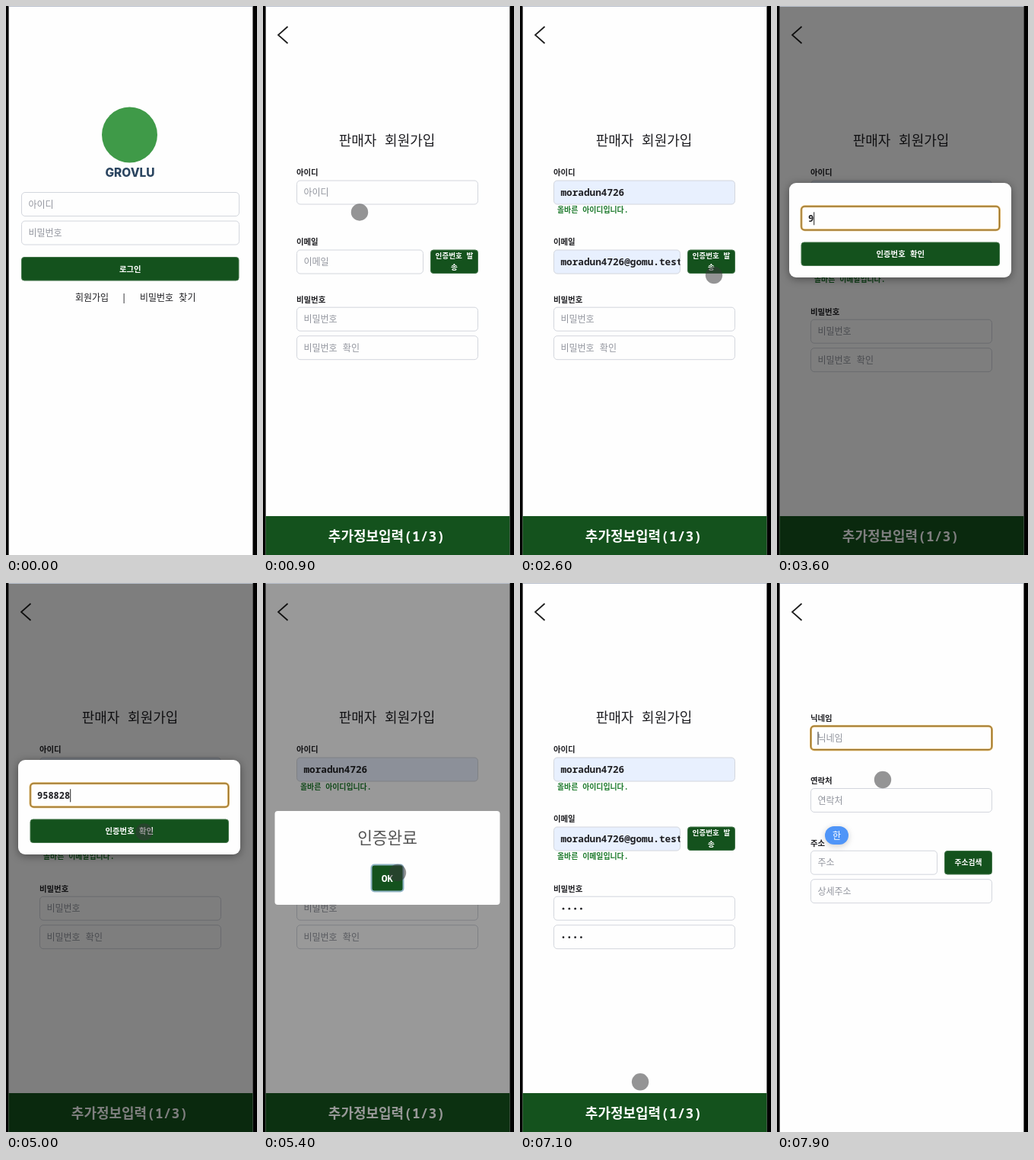
Write an HTML page with a canvas that moves like this. It is 330 by 720 pixels and loops after 8000 ms.

```html
<!DOCTYPE html>
<html lang="ko">
<head>
<meta charset="utf-8">
<title>회원가입</title>
<style>
html, body { margin: 0; width: 100%; height: 100%; overflow: hidden; background: #000; }
canvas { display: block; width: 330px; height: 720px; }
</style>
</head>
<body>
<canvas id="stage"></canvas>
<script>
const LOOP = 8000;
const MONO = '"Noto Sans Mono", "Noto Sans CJK KR", "Noto Sans CJK", monospace';
const SANS = 'Inter, Roboto, sans-serif';
const GREEN = '#14521d', INK = '#1f1f23', HINT = '#92959e', VALID = '#1d7a2c', ERROR = '#dc2f2f';
const USER = 'moradun4726', MAIL = USER + '@gomu.test', CODE = '958828';

const canvas = document.getElementById('stage');
const ctx = canvas.getContext('2d');
const ratio = window.devicePixelRatio || 1;
canvas.width = 330 * ratio;
canvas.height = 720 * ratio;

// The pointer shows up shortly before each tap and rests briefly after it
const taps = [
  { at: 400, x: 113, y: 384 },
  { at: 1000, x: 130, y: 246 },
  { at: 1600, x: 208, y: 346 },
  { at: 2180, x: 190, y: 538 },
  { at: 2560, x: 255, y: 353 },
  { at: 5060, x: 180, y: 326 },
  { at: 5370, x: 177, y: 380 },
  { at: 5820, x: 124, y: 428 },
  { at: 6270, x: 126, y: 470 },
  { at: 7200, x: 165, y: 694 },
  { at: 7540, x: 139, y: 204 },
  { at: 7690, x: 139, y: 258 }
];

const clamp = v => Math.max(0, Math.min(1, v));
const ramp = (t, start, span) => {
  const p = clamp((t - start) / span);
  return p * p * (3 - 2 * p);
};
const pulse = (t, start, end, span) => ramp(t, start, span) * (1 - ramp(t, end, span));
const within = (t, a, b) => t >= a && t < b;
const typed = (t, start, step, max) => Math.max(0, Math.min(max, Math.floor((t - start) / step) + 1));

function text(str, x, y, size, color = INK, { weight = 400, align = 'left', font = MONO } = {}) {
  ctx.font = `${weight} ${size}px ${font}`;
  ctx.textAlign = align;
  ctx.fillStyle = color;
  ctx.fillText(str, x, y);
}

const centered = (str, x, y, size, color = '#fff', weight = 700) =>
  text(str, x, y, size, color, { weight, align: 'center' });
const label = (str, y) => text(str, 44, y, 10.4, INK, { weight: 700 });
const note = (str, y, color) => text(str, 49, y, 9.9, color, { weight: 700 });

function box(x, y, w, h, r, fill) {
  ctx.beginPath();
  ctx.roundRect(x, y, w, h, r);
  ctx.fillStyle = fill;
  ctx.fill();
}

function stroke(color, width) {
  ctx.strokeStyle = color;
  ctx.lineWidth = width;
  ctx.stroke();
}

function disc(x, y, r, fill) {
  ctx.beginPath();
  ctx.arc(x, y, r, 0, 7);
  ctx.fillStyle = fill;
  ctx.fill();
}

function shadowed(alpha, blur, draw) {
  ctx.save();
  ctx.shadowColor = `rgba(0,0,0,${alpha})`;
  ctx.shadowBlur = blur * ratio;
  ctx.shadowOffsetY = 2 * ratio;
  draw();
  ctx.restore();
}

function faded(alpha, draw, scale = 1, cx = 0, cy = 0) {
  if (alpha <= 0) return;
  ctx.save();
  ctx.globalAlpha *= alpha;
  ctx.translate(cx, cy);
  ctx.scale(scale, scale);
  ctx.translate(-cx, -cy);
  draw();
  ctx.restore();
}

function button(x, y, w, h, lines, size) {
  box(x + .5, y + .5, w - 1, h - 1, 3.5, GREEN);
  stroke('#427549', 1);
  lines.forEach((line, i) => {
    const offset = (i - (lines.length - 1) / 2) * 15;
    centered(line, x + w / 2, y + h / 2 + size * .37 + offset, size);
  });
}

function field(x, y, w, hint, { value = '', size = 12.7, dots = 0, focus = false, fill = '#fefefe' } = {}) {
  box(x + .5, y + .5, w - 1, 31, 4.5, fill);
  if (focus) {
    stroke('#dfb669', 3);
    stroke('#93702f', 1.2);
  } else {
    stroke('#d3d6dd', 1);
  }
  ctx.save();
  ctx.beginPath();
  ctx.rect(x, y, w - .5, 32);
  ctx.clip();
  const left = x + 9.5;
  if (value) text(value, left, y + 20.5, size, INK, { weight: 600 });
  else if (!dots) text(hint, left, y + 20.5, 12, HINT);
  for (let i = 0; i < dots; i++) disc(left + 3.5 + i * 7.8, y + 16.5, 1.35, INK);
  if (focus) {
    const end = value ? ctx.measureText(value).width : dots * 7.8;
    ctx.fillStyle = '#222';
    ctx.fillRect(left + end, y + 8, 1, 17);
  }
  ctx.restore();
}

function backArrow() {
  ctx.beginPath();
  ctx.moveTo(32.5, 27);
  ctx.lineTo(20, 38);
  ctx.lineTo(32.5, 49);
  stroke('#1c1c1c', 1.7);
}

function bottomBar(shown, step) {
  if (shown <= 0) return;
  const y = 720 - 51 * shown;
  ctx.fillStyle = GREEN;
  ctx.fillRect(3, y, 322, 51);
  centered(`추가정보입력(${step}/3)`, 162.5, y + 32.5, 18);
}

function loginPage() {
  disc(162.5, 169, 36.5, '#3f9a48');
  text('GROVLU', 163, 223.5, 15.5, '#2b4560', { weight: 800, align: 'center', font: SANS });
  field(20, 244, 287, '아이디');
  field(20, 281.5, 287, '비밀번호');
  button(20, 329, 286.5, 31.5, ['로그인'], 10.4);
  text('회원가입', 91, 387, 12);
  centered('|', 155, 386.5, 12, INK, 400);
  text('비밀번호 찾기', 176, 387, 12);
}

function accountPage(t) {
  const hasId = t >= 1280, hasMail = t >= 2180, sent = t >= 2660;
  const autofill = (value, done) => done ? { value, fill: '#e8f0fe' } : {};
  const shift = sent ? 16 : 0;
  const dots = typed(t, 5920, 60, 4), repeatDots = typed(t, 6480, 80, 4);
  backArrow();
  centered('판매자 회원가입', 163, 183, 18, INK, 400);

  label('아이디', 222);
  field(44, 228.5, 239, '아이디', { ...autofill(USER, hasId), focus: within(t, 1000, 1600) });
  if (hasId) note('올바른 아이디입니다.', 271, VALID);

  label('이메일', 313);
  field(44, 319.5, 167, '이메일', { ...autofill(MAIL, hasMail), focus: within(t, 1600, 2400) });
  button(220, 319.5, 63, 31.5, ['인증번호 발', '송'], 9.6);
  if (sent) note('올바른 이메일입니다.', 362, VALID);

  label('비밀번호', 388.5 + shift);
  field(44, 394.7 + shift, 239, '비밀번호', { dots, focus: within(t, 5820, 6270) });
  field(44, 432.2 + shift, 239, '비밀번호 확인', { dots: repeatDots, focus: within(t, 6270, 6880) });
  if (dots && repeatDots < 4) note('비밀번호를 입력해주세요.', 491, ERROR);

  bottomBar(1 - ramp(t, 1000, 120) + pulse(t, 2380, 5820, 120) + ramp(t, 6880, 120), 1);
}

function profilePage(t) {
  backArrow();
  label('닉네임', 181);
  field(44, 187.2, 239, '닉네임', { focus: t >= 7560 });
  label('연락처', 263);
  field(44, 269, 239, '연락처');
  label('주소', 345);
  field(44, 350.7, 167, '주소');
  button(220, 351, 63, 31.5, ['주소검색'], 9.8);
  field(44, 388.2, 239, '상세주소');
  bottomBar(1 - ramp(t, 7560, 120), 2);

  const badge = ramp(t, 7800, 90);
  faded(badge, () => {
    shadowed(.2, 9, () => box(63, 319, 31, 24, 12, '#4f95f8'));
    centered('한', 78.5, 335.5, 12, '#fff', 500);
  }, .5 + .5 * badge, 78.5, 331);
}

function suggestion() {
  shadowed(.25, 6, () => {
    ctx.beginPath();
    ctx.roundRect(62, 510.5, 254, 51.5, 9);
    ctx.moveTo(74, 511);
    ctx.bezierCurveTo(82, 511, 84, 503, 87, 503);
    ctx.bezierCurveTo(90, 503, 92, 511, 100, 511);
    ctx.fillStyle = '#fdf9fe';
    ctx.fill();
  });
  text(MAIL, 77, 542, 15.2, '#202024', { weight: 500, font: SANS });
}

function dim(alpha) {
  ctx.fillStyle = `rgba(0,0,0,${alpha})`;
  ctx.fillRect(3, 0, 322, 720);
}

function codeModal(t) {
  shadowed(.4, 12, () => box(16, 232, 292, 124, 9, '#fefefe'));
  const value = CODE.slice(0, typed(t, 3480, 270, CODE.length));
  field(31.5, 262.3, 261.5, '', { value, size: 12, focus: true });
  button(31.5, 309.5, 261.5, 31.5, ['인증번호 확인'], 10.4);
}

function doneDialog() {
  box(15.5, 299, 296, 123, 4, '#fefefe');
  centered('인증완료', 163.5, 342, 21.4, '#545454', 400);
  box(142.5, 369.5, 42, 35, 4, GREEN);
  stroke('#8fb3c4', 2);
  centered('OK', 163.5, 391.5, 13);
}

function pointer(t) {
  const next = taps.find(tap => tap.at > t) ?? taps.at(-1);
  const last = taps.findLast(tap => tap.at <= t) ?? next;
  const p = ramp(t, Math.max(last.at + 60, next.at - 260), 220);
  const alpha = Math.max(...taps.map(tap => pulse(t, tap.at - 260, tap.at + 240, 70)));
  const x = last.x + (next.x - last.x) * p, y = last.y + (next.y - last.y) * p;
  faded(alpha, () => disc(x, y, 11.2, 'rgba(55,55,58,.53)'));
}

function draw(t) {
  ctx.setTransform(ratio, 0, 0, ratio, 0, 0);
  ctx.fillStyle = '#000';
  ctx.fillRect(0, 0, 330, 720);
  ctx.save();
  ctx.beginPath();
  ctx.rect(3.6, 0, 320.8, 720);
  ctx.clip();
  ctx.fillStyle = '#fefefe';
  ctx.fillRect(0, 0, 330, 720);

  if (t < 520) loginPage();
  else if (t < 7280) accountPage(t);
  else profilePage(t);

  faded(pulse(t, 1610, 2180, 80), suggestion);

  dim(.5 * pulse(t, 2650, 5060, 60));
  faded(pulse(t, 2720, 5040, 120), () => codeModal(t));

  // The dialog springs open past full size and shrinks away
  dim(.4 * pulse(t, 5060, 5600, 100));
  const p = clamp((t - 5060) / 300);
  const scale = 1 - .3 * (1 - p) ** 2 * Math.cos(6 * p) - .4 * ramp(t, 5590, 130);
  faded(pulse(t, 5060, 5600, 110), doneDialog, scale, 163.5, 360.5);

  pointer(t);
  ctx.fillStyle = '#b9c0cc';
  ctx.fillRect(3, 0, 322, 1);
  ctx.restore();
}

function tick() {
  draw(performance.now() % LOOP);
  requestAnimationFrame(tick);
}
tick();
</script>
</body>
</html>
```
